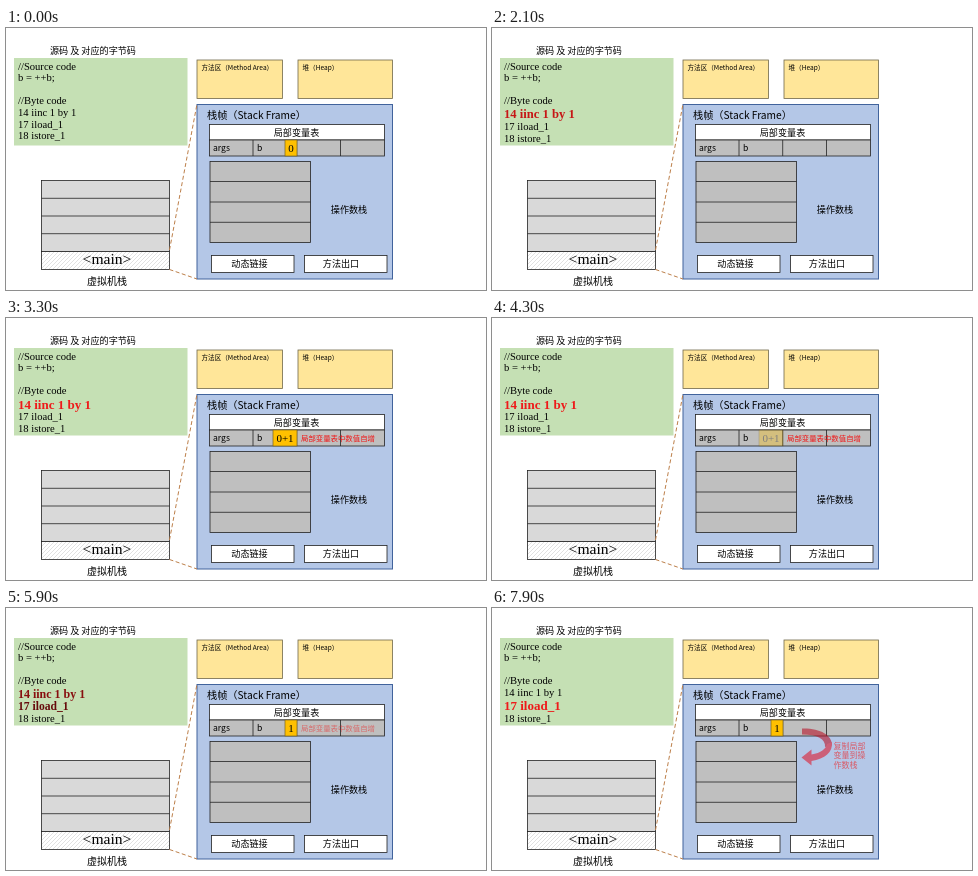
An HTML page that plays this animation: 480 by 262 pixels, repeating every 8 s.

```html
<!DOCTYPE html>
<html lang="zh-CN">
<head>
<meta charset="utf-8">
<style>
  html, body { margin: 0; width: 100%; height: 100%; overflow: hidden; background: #fff; }
  svg { display: block; width: 480px; height: 262px; }
  text { font-family: "Noto Sans CJK SC", "Noto Sans CJK", "Open Sans", sans-serif; font-size: 9.1px; white-space: pre; }
  .serif, .serif text { font-family: "Liberation Serif", serif; }
  .mid { text-anchor: middle; }
  .line { stroke: #222; stroke-width: .8; }
  .red { fill: #f01414; }
</style>
</head>
<body>
<svg viewBox="0 0 480 262">
  <defs>
    <pattern id="dots" width="4" height="4" patternUnits="userSpaceOnUse">
      <rect width="4" height="4" fill="#fff"/>
      <path d="M0 4L4 0M-1 1L1 -1M3 5L5 3" stroke="#d4d4d4" stroke-width=".7"/>
    </pattern>
  </defs>

  <text x="44" y="26">源码 及 对应的字节码</text>
  <rect x="8" y="30" width="173.5" height="87.5" fill="#c5e0b4"/>
  <g id="code" class="serif"></g>

  <g class="line">
    <rect x="35.5" y="152.5" width="128" height="71" fill="#d9d9d9"/>
    <rect x="35.5" y="223.5" width="128" height="18" fill="url(#dots)"/>
    <path d="M35.5 170.3h128M35.5 188h128M35.5 205.7h128"/>
  </g>
  <text class="serif mid" x="101" y="236" style="font-size:15.6px">&lt;main&gt;</text>
  <text class="mid" x="101" y="257" style="font-size:10px">虚拟机栈</text>

  <g fill="#ffe699" stroke="#70684a" stroke-width=".8">
    <rect x="191" y="32" width="85.5" height="38.5"/>
    <rect x="292" y="32" width="94.5" height="38.5"/>
  </g>
  <text x="195.5" y="41.5" style="font-size:6.6px">方法区（Method Area）</text>
  <text x="296.5" y="41.5" style="font-size:6.6px">堆（Heap）</text>

  <rect x="191" y="76.5" width="195.5" height="174.5" fill="#b4c7e7" stroke="#41639c"/>
  <path d="M163.5 222L191 76M163.5 241.5L191 251" fill="none" stroke="#bd7f4a" stroke-dasharray="4 2.5"/>
  <text x="201" y="91" style="font-size:10.2px">栈帧（Stack Frame）</text>

  <g class="line">
    <rect x="203.5" y="96.5" width="175" height="15.5" fill="#fff"/>
    <rect x="203.5" y="112" width="175" height="16" fill="#bfbfbf"/>
    <path d="M247 112v16M290.7 112v16M334.5 112v16"/>
    <rect x="204" y="133.5" width="100.5" height="81" fill="#bfbfbf"/>
    <path d="M204 153.5h100.5M204 174h100.5M204 194.3h100.5"/>
    <rect x="205.5" y="227.5" width="82.5" height="17" fill="#fff"/>
    <rect x="298.5" y="227.5" width="82.5" height="17" fill="#fff"/>
  </g>
  <text class="mid" x="290.5" y="107.7">局部变量表</text>
  <text x="207" y="123" style="font-size:8.6px">args</text>
  <text x="251" y="123" style="font-size:8.6px">b</text>
  <text class="mid" x="343" y="185">操作数栈</text>
  <text class="mid" x="243.5" y="239.3">动态链接</text>
  <text class="mid" x="335" y="239.3">方法出口</text>

  <g id="cells" class="serif mid"></g>
  <text id="note" class="red" x="295" y="123" style="font-size:7.4px;font-weight:500">局部变量表中数值自增</text>
  <g id="copy">
    <path d="M310 120.5C328 120 340 127 340 137L333 139C334 131 325 126.5 310 126.5Z" fill="#b8182c"/>
    <path d="M340 134C341 144 333 151 319.5 153V157.5L309.5 149.5L319.5 141.5V146.5C329 145 334 141 335 136Z" fill="#dc1e34"/>
    <g class="red">
      <text x="341.5" y="141" style="font-size:8px">复制局部</text>
      <text x="341.5" y="150.3" style="font-size:8px">变量到操</text>
      <text x="341.5" y="159.6" style="font-size:8px">作数栈</text>
    </g>
  </g>
</svg>
<script>
const LOOP = 8000, STEP = 100, SIZE = 10.6, GROWTH = 2.4, LEADING = 1.1;
const $ = id => document.getElementById(id);
const ramp = (t, from, to) => Math.min(1, Math.max(0, (t - from) / (to - from)));

function add(parent, tag, attrs, content = '') {
  const node = document.createElementNS('http://www.w3.org/2000/svg', tag);
  for (const key in attrs) node.setAttribute(key, attrs[key]);
  node.textContent = content;
  parent.append(node);
  return node;
}

const lines = ['//Source code', 'b = ++b;', '', '//Byte code', '14 iinc 1 by 1', '17 iload_1', '18 istore_1']
  .map(s => add($('code'), 'text', { x: 12 }, s));

const [zero, sum, one] = [['0', 279], ['0+1', 267], ['1', 279]].map(([value, x]) => {
  const g = add($('cells'), 'g', {});
  add(g, 'rect', { x, y: 112, width: 291 - x, height: 16, fill: '#ffc000', stroke: '#7a6420', 'stroke-width': .7 });
  add(g, 'text', { x: (x + 291) / 2, y: 123.8, style: 'font-size:11px' }, value);
  return g;
});

function layoutCode(emphasis) {
  let y = 41.5 - SIZE * LEADING;
  lines.forEach((line, i) => {
    const e = emphasis[i] || 0, size = SIZE + GROWTH * e;
    y += size * LEADING;
    line.setAttribute('y', y);
    line.style.fontSize = size + 'px';
    line.style.fontWeight = e > 0 ? 700 : 400;
    line.style.fill = `rgb(${238 * e},${26 * e},${26 * e})`;
  });
}

function draw(t) {
  const next = ramp(t, 5600, 6300);
  layoutCode({ 4: ramp(t, 1600, 2200) - next, 5: next });
  zero.style.opacity = 1 - ramp(t, 1600, 2100);
  sum.style.opacity = ramp(t, 2300, 2900) - ramp(t, 3900, 4500);
  one.style.opacity = ramp(t, 4600, 5200);
  $('note').style.opacity = ramp(t, 2300, 2900) - ramp(t, 5600, 6200);
  $('copy').style.opacity = ramp(t, 7700, 8030);
}

function tick() {
  draw(Math.floor(performance.now() % LOOP / STEP) * STEP);
  requestAnimationFrame(tick);
}
tick();
</script>
</body>
</html>
```
